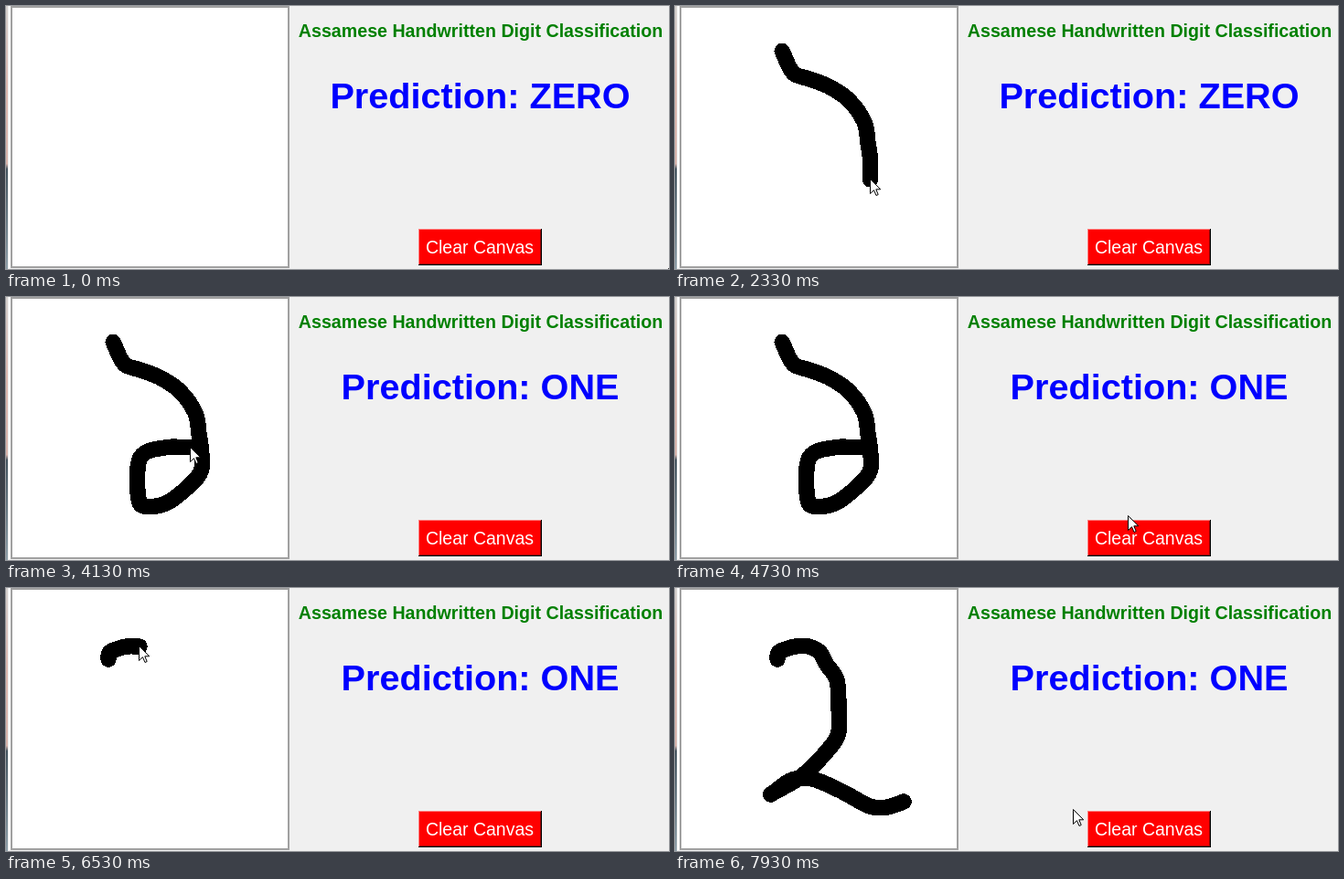
Animation, 725 px wide and 288 px high, one loop 8 s. Source, as an HTML page:

```html
<!DOCTYPE html>
<html lang="en">
<head>
<meta charset="utf-8">
<title>Digit classification</title>
<style>
  html, body { margin: 0; width: 100%; height: 100%; overflow: hidden; background: #f0f0f0; }
  svg { display: block; font-family: "Liberation Sans", Arial, sans-serif; }
  text { text-anchor: middle; }
  .bold { font-weight: bold; }
  #strip { fill: url(#photo); }
  #ink { fill: none; stroke: #000; stroke-width: 17.4; stroke-linecap: round; stroke-linejoin: round; }
  #label { font-size: 19.5px; fill: #fff; }
  #face { fill: #f00; }
  #lit { fill: #ff7f7f; }
  #shade { fill: #900; }
  .down #face { fill: #f0f0f0; }
  .down #lit { fill: #000; }
  .down #edge { fill: #fff; }
  .down #shade { fill: #f0f0f0; }
  .down #label { fill: #000; transform: translate(1px, 1px); }
</style>
</head>
<body>
<svg width="725" height="288" viewBox="0 0 725 288">
  <defs>
    <linearGradient id="photo" x2="0" y2="1">
      <stop offset="0" stop-color="#d4d0ce"/>
      <stop offset=".3" stop-color="#dcb8b0"/>
      <stop offset=".6" stop-color="#d8b4ac"/>
      <stop offset=".62" stop-color="#44545f"/>
      <stop offset="1" stop-color="#8fa0aa"/>
    </linearGradient>
  </defs>
  <g shape-rendering="crispEdges">
    <rect id="strip" width="2" height="288"/>
    <rect x="3" width="2" height="287" fill="#fff"/>
    <rect x="5" width="305" height="287" fill="#a0a0a0"/>
    <rect x="7" y="2" width="301" height="283" fill="#fff"/>
    <path id="ink"/>
  </g>
  <text class="bold" x="519" y="34" font-size="19.65" fill="#008000">Assamese Handwritten Digit Classification</text>
  <text class="bold" id="guess" x="518.5" y="112" font-size="39.65" fill="#00f"></text>
  <g id="button">
    <g shape-rendering="crispEdges">
      <rect id="edge" x="451" y="244" width="135" height="40"/>
      <rect id="lit" x="451" y="244" width="134" height="39"/>
      <rect id="shade" x="452" y="245" width="133" height="38"/>
      <rect id="face" x="452" y="245" width="132" height="37"/>
    </g>
    <text id="label" x="518" y="271">Clear Canvas</text>
  </g>
  <path id="cursor" d="M.5 .5V16.5L4.5 12.7 7 18.5 9.2 17.5 6.8 11.8H11.7Z" fill="#fff" stroke="#000"/>
</svg>
<script>
const LOOP = 8000, FPS = 15, FRAMES = LOOP * FPS / 1000;
const byId = id => document.getElementById(id);
const pen = [[725, 288]];   // pointer position for each frame

function holdTo(frame) {
  while (pen.length <= frame) pen.push(pen[pen.length - 1]);
}

// Ease from the last position to (x, y) between two frames
function glide(from, to, x, y) {
  holdTo(from);
  const [x0, y0] = pen[from];
  for (let i = from + 1; i <= to; i++) {
    const u = (i - from) / (to - from), e = u * u * (3 - 2 * u);
    pen[i] = [x0 + (x - x0) * e, y0 + (y - y0) * e];
  }
}

// One position per frame
function trace(start, points) {
  holdTo(start - 1);
  pen.push(...points.split(' ').map(p => p.split(',').map(Number)));
}

glide(2, 11, 55, 58);
glide(11, 15, 118, 51);
trace(28, '129,73 147,80 168,88 190,103 207,127 211,150 213.5,168 213.5,190 200,207 ' +
  '175,226 151,229 144.5,218 144.5,184 153,170 177,164.5 193,164.5 202,164.5');
glide(65, 71, 496, 240);
glide(71, 74, 519, 260);
glide(78, 85, 48, 75);
glide(85, 88, 99, 69);
glide(88, 89, 112, 78);
trace(94, '112,75 114,70 121,67 132,64 146,64 158,70 166,84 177,101 179,130 ' +
  '179,157 170,174 140,205 108,224');
trace(108, '128,210 150,209 181,222 213,239 232,240 250,234');
glide(115, 119, 436, 243);
holdTo(FRAMES);

// Smooth curve through the pen positions of a span of frames
function curve(first, last) {
  let d = 'M' + pen[first];
  for (let i = first; i < last; i++) {
    const a = pen[i], b = pen[i + 1];
    const before = pen[i - 1], after = pen[Math.min(i + 2, last)];
    const c1 = a.map((v, j) => v + (b[j] - before[j]) / 6);
    const c2 = b.map((v, j) => v - (after[j] - a[j]) / 6);
    d += `C${c1} ${c2} ${b}`;
  }
  return d;
}

function stroke(frame) {
  if (frame >= 92) return curve(91, Math.min(frame, 113));
  return frame >= 25 && frame < 78 ? curve(24, Math.min(frame, 44)) : '';
}

function draw(now) {
  const frame = Math.floor((now % LOOP + 5) * FPS / 1000) % FRAMES;
  const [x, y] = pen[frame];
  byId('ink').setAttribute('d', stroke(frame));
  byId('cursor').setAttribute('transform', `translate(${Math.round(x) - 1} ${Math.round(y) - 1})`);
  byId('guess').textContent = 'Prediction: ' + (frame < 62 ? 'ZERO' : 'ONE');
  byId('button').classList.toggle('down', frame >= 76 && frame < 78);
}

const begin = performance.now();
function tick() {
  draw(performance.now() - begin);
  requestAnimationFrame(tick);
}
tick();
</script>
</body>
</html>
```
